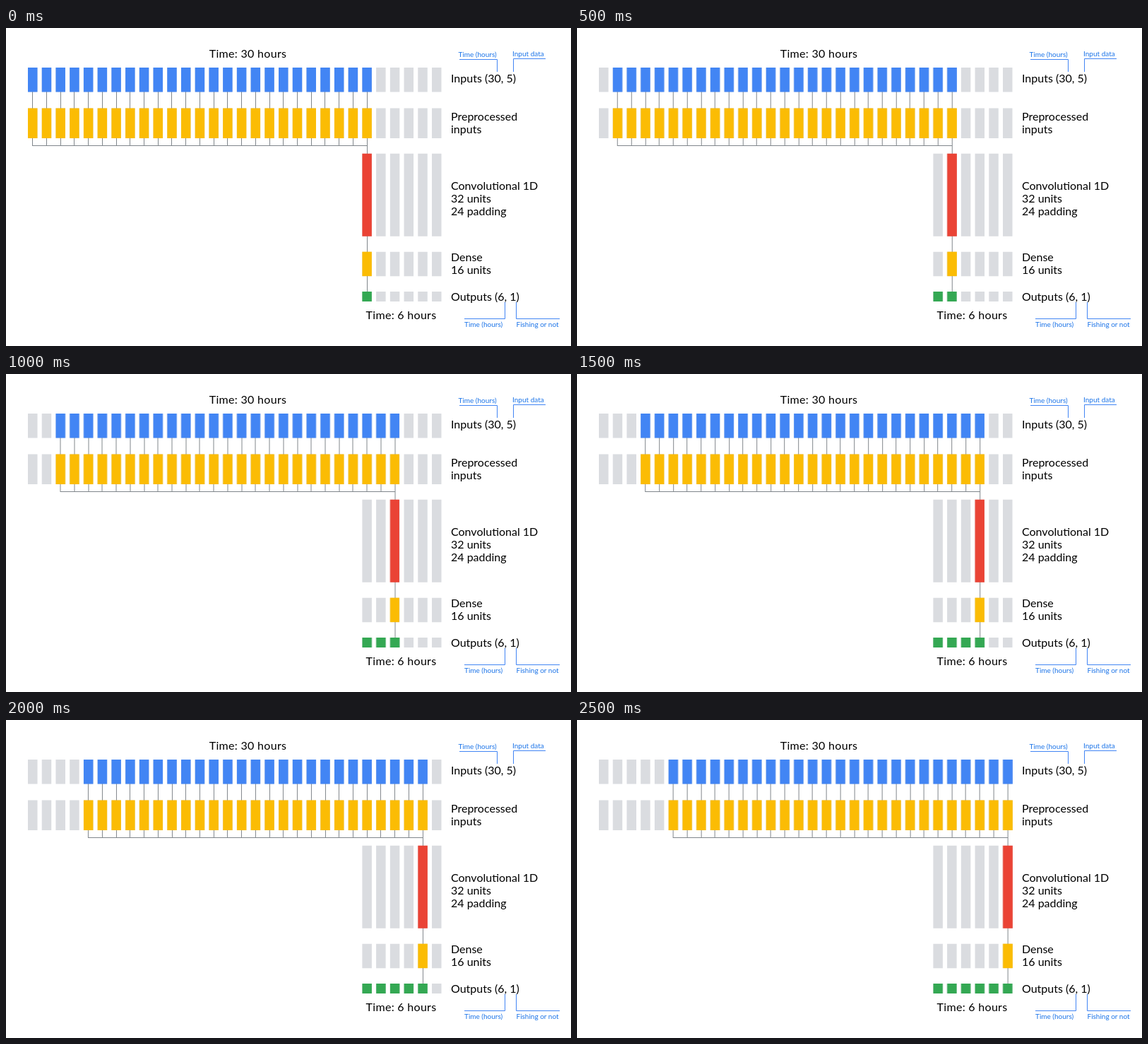
Write an HTML page that moves like this. It is 800x450 px and loops after 3 s.

```html
<!DOCTYPE html>
<html lang="en">
<head>
<meta charset="utf-8">
<title>Sliding window convolution</title>
<style>
  html, body { margin: 0; width: 100%; height: 100%; overflow: hidden; background: #fff; }
  svg { display: block; width: 800px; height: 450px; }

  /* Each row of bars is one thick dashed line: 13.5 wide, 19.724 apart. */
  .bars { fill: none; stroke-dasharray: 13.5 6.224; }
  .idle { stroke: #dadce0; }
  .blue { stroke: #4285f4; }
  .yellow { stroke: #fbbc04; }
  .red { stroke: #ea4335; }
  .green { stroke: #34a853; }
  .wires { fill: none; stroke: #80868b; shape-rendering: crispEdges; }
  .ticks { stroke-dasharray: 1 18.724; }
  .guides { fill: none; stroke: #4285f4; }

  text { font: 16px Lato, "Open Sans", sans-serif; fill: #000; }
  .bold { font-weight: 700; }
  .head { letter-spacing: .3px; }
  .note { font-size: 10px; fill: #1a73e8; }

  /* Six columns, one per half second. */
  .window { animation: slide 3s steps(6, end) infinite; }
  @keyframes slide { to { transform: translateX(118.344px); } }
</style>
</head>
<body>
<svg viewBox="0 0 800 450">
  <clipPath id="outputs"><path d="M504 370H620V390H504Z"/></clipPath>

  <g class="bars idle">
    <path d="M31 73.25h585.5" stroke-width="34.5"/>
    <path d="M31 134.75h585.5" stroke-width="42.5"/>
    <path d="M504.38 236.25h112.12" stroke-width="117"/>
    <path d="M504.38 333.9h112.12" stroke-width="34.5"/>
    <path d="M504.38 380h112.12" stroke-width="14"/>
  </g>

  <g class="window">
    <g class="wires">
      <path class="ticks" d="M37.2 102h475" stroke-width="24"/>
      <path class="ticks" d="M37.2 161h475" stroke-width="11"/>
      <path d="M37.2 166.5H511.6M511.1 166V178M511.1 294V317M511.1 351V373"/>
    </g>
    <g class="bars">
      <path class="blue" d="M31 73.25h486.88" stroke-width="34.5"/>
      <path class="yellow" d="M31 134.75h486.88" stroke-width="42.5"/>
      <path class="red" d="M504.38 236.25h13.5" stroke-width="117"/>
      <path class="yellow" d="M504.38 333.9h13.5" stroke-width="34.5"/>
    </g>
  </g>

  <!-- Finished outputs emerge from behind the left edge. -->
  <g clip-path="url(#outputs)">
    <path class="bars green window" d="M405.76 380h112.12" stroke-width="14"/>
  </g>

  <g class="guides">
    <path d="M642 44.5H695.5V62M764 43.5H718.5V62"/>
    <path d="M649 411.5H706.5V388M784 411.5H722.5V388"/>
  </g>

  <g class="bold">
    <text class="head" x="342.5" y="42" text-anchor="middle">Time: 30 hours</text>
    <text class="head" x="559.5" y="412" text-anchor="middle">Time: 6 hours</text>
    <text x="630" y="77">Inputs (30, 5)</text>
    <text x="630" y="130.5">Preprocessed</text>
    <text x="630" y="149">inputs</text>
    <text x="630" y="228.5">Convolutional 1D</text>
    <text x="630" y="330">Dense</text>
    <text x="630" y="385.5">Outputs (6, 1)</text>
  </g>
  <text x="630" y="247">32 units</text>
  <text x="630" y="265">24 padding</text>
  <text x="630" y="348">16 units</text>

  <text class="note" x="640.5" y="40.5">Time (hours)</text>
  <text class="note" x="717" y="40">Input data</text>
  <text class="note" x="649" y="422.5">Time (hours)</text>
  <text class="note" x="722.5" y="422.5">Fishing or not</text>
</svg>
</body>
</html>
```
